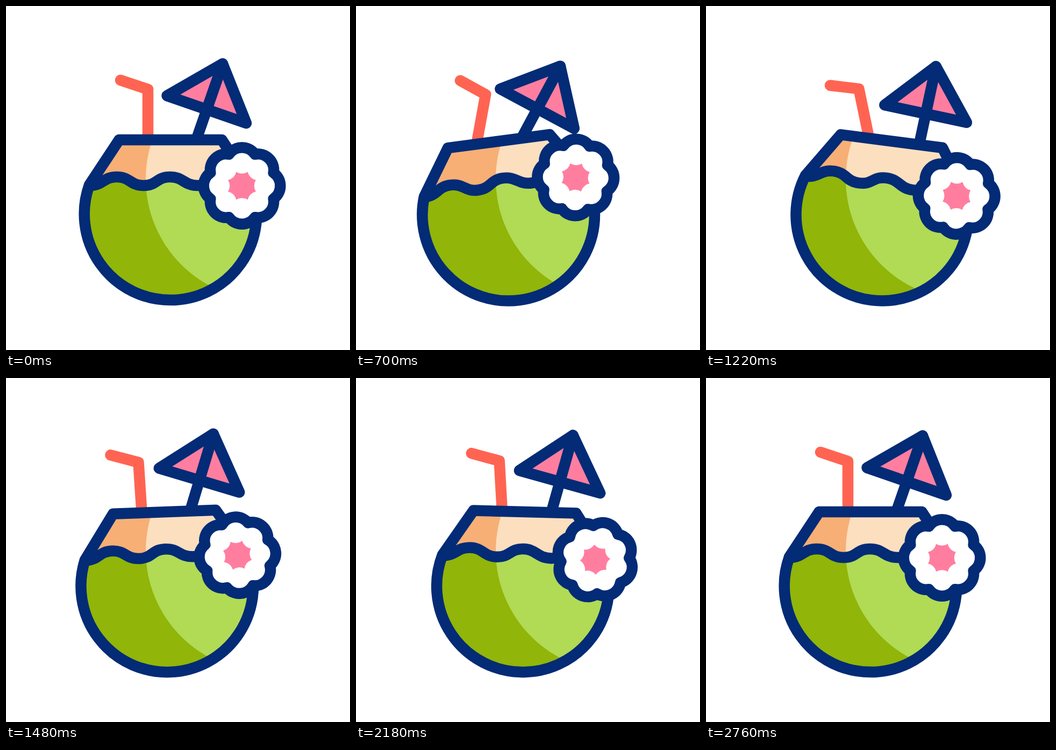
Write an HTML page that moves like this. It is 640 px wide and 640 px high and loops after 2.8 s.

```html
<!DOCTYPE html>
<html lang="en">
<head>
<meta charset="utf-8">
<title>Coconut drink</title>
<style>
  @property --cup { syntax: "<angle>"; inherits: true; initial-value: 0deg; }
  @property --straw { syntax: "<angle>"; inherits: true; initial-value: 0deg; }
  @property --shade { syntax: "<angle>"; inherits: true; initial-value: 0deg; }
  @property --flower { syntax: "<angle>"; inherits: true; initial-value: 0deg; }

  html, body { margin: 0; width: 100%; height: 100%; overflow: hidden; background: #fff; }
  svg {
    display: block; width: 100%; height: 100%;
    animation: rock 2800ms cubic-bezier(.333, 0, .667, 1) infinite;
  }

  /* Damped rocking; the parts on top swing against the cup */
  @keyframes rock {
    0%, 4.11%    { --cup: 0deg;    --straw: 0deg;    --shade: 0deg;     --flower: 0deg; }
    24.29%       { --cup: -7.6deg; --straw: 18deg;   --shade: 16.8deg;  --flower: 9deg; }
    43.93%       { --cup: 7.35deg; --straw: -19deg;  --shade: -14.4deg; --flower: -6.5deg; }
    57.86%       { --cup: -6deg;   --straw: 5.5deg;  --shade: 5.5deg; }
    70%          { --cup: 4.4deg;  --straw: -10deg;  --shade: -10deg; }
    78.57%       { --flower: 18deg; }
    87.14%       { --cup: -2.2deg; --straw: 2deg;    --shade: 1.5deg; }
    97.86%, 100% { --cup: 0deg;    --straw: 0deg;    --shade: 0deg;     --flower: 0deg; }
  }

  #cup, #light { transform-origin: 306px 557px; }
  #cup { transform: rotate(var(--cup)); }
  #light { transform: rotate(calc(-1 * var(--cup))); }
  #straw { transform-origin: 264px 250px; transform: rotate(var(--straw)); }
  #shade { transform-origin: 359px 235px; transform: rotate(var(--shade)); }
  #flower { transform-origin: 439px 335px; transform: rotate(var(--flower)); }

  .line { stroke: #032b76; stroke-width: 20.5; stroke-linecap: round; stroke-linejoin: round; }
  .pink { fill: #ff7ea0; }
</style>
</head>
<body>
<svg viewBox="0 0 640 640">
  <defs>
    <path id="shell" d="M210.5 249H401.5L457 333A160.3 160.3 0 1 1 155 333Z"/>
    <path id="wave" d="M155 334C181 334 181 318 206 318S231 334 256 334S280 318 305 318S331 334 357 334S382 318 407 318S432 334 458 334"/>
    <clipPath id="inside"><use href="#shell"/></clipPath>
    <clipPath id="above"><path d="M155 334C181 334 181 318 206 318S231 334 256 334S280 318 305 318S331 334 357 334S382 318 407 318S432 334 458 334V200H155Z"/></clipPath>
    <mask id="lit" maskUnits="userSpaceOnUse" x="0" y="0" width="640" height="640">
      <circle id="light" cx="485" cy="322" r="225" fill="#fff"/>
    </mask>
  </defs>
  <g id="cup">
    <path id="straw" d="M264 250V155L213 138" fill="none" stroke="#ff6452"
      stroke-width="20.5" stroke-linecap="round" stroke-linejoin="round"/>
    <g id="shade" class="line">
      <path class="pink" d="M403 107.5L299.5 167L447 218Z"/>
      <path d="M403 107.5L353.6 250"/>
    </g>
    <g clip-path="url(#inside)">
      <path fill="#91b508" d="M100 200H520V580H100Z"/>
      <path fill="#f7af75" clip-path="url(#above)" d="M100 200H520V580H100Z"/>
      <g mask="url(#lit)">
        <path fill="#b1da55" d="M100 200H520V580H100Z"/>
        <path fill="#fcdfbe" clip-path="url(#above)" d="M100 200H520V580H100Z"/>
      </g>
    </g>
    <use href="#wave" class="line" fill="none"/>
    <use href="#shell" class="line" fill="none"/>
    <g id="flower">
      <path id="petals" class="line" fill="#fff"/>
      <path id="heart" class="pink"/>
    </g>
  </g>
</svg>
<script>
  // Eight arcs around the flower's centre; sweep 1 bulges out, 0 bends in
  function scallop(id, radius, bend, sweep) {
    let d = "";
    for (let i = 0; i <= 8; i++) {
      const a = (i + 0.5) * Math.PI / 4;
      const x = (439 + radius * Math.cos(a)).toFixed(2);
      const y = (334.5 + radius * Math.sin(a)).toFixed(2);
      d += i ? `A${bend} ${bend} 0 0 ${sweep} ${x} ${y}` : `M${x} ${y}`;
    }
    document.getElementById(id).setAttribute("d", d + "Z");
  }
  scallop("petals", 63.5, 29.6, 1);
  scallop("heart", 28, 20, 0);
</script>
</body>
</html>
```
